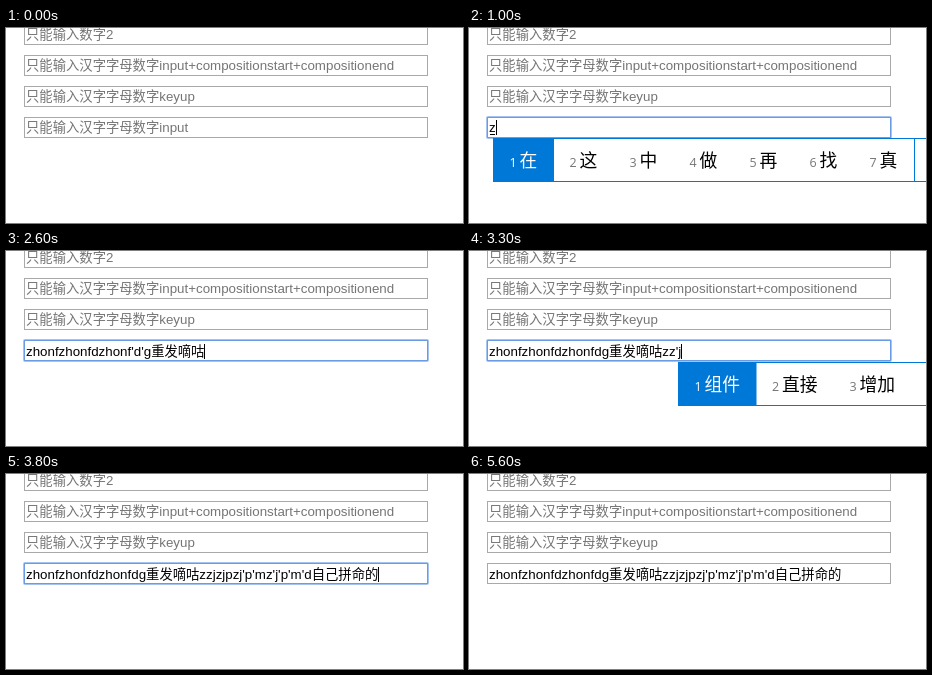
These frames come from a looping animation (457 by 195 pixels, 5700 ms). An HTML page:

```html
<!DOCTYPE html>
<html lang="zh-CN">
<head>
<meta charset="utf-8">
<style>
html, body { margin: 0; width: 100%; height: 100%; overflow: hidden; background: #fff; }
svg { display: block; }
text { font-family: "Liberation Sans", Arial, "Noto Sans CJK SC", "Noto Sans CJK", sans-serif; white-space: pre; }
.field { font-size: 13.333px; }
.cand { font-size: 17.8px; }
.num { font-family: "Open Sans", "Noto Sans", sans-serif; font-size: 12.5px; }
</style>
</head>
<body>
<svg id="stage" width="457" height="195" viewBox="0 0 457 195"></svg>
<script>
const NS = 'http://www.w3.org/2000/svg';
const LOOP = 5700;
const BLUE = '#0078d7';
const stage = document.getElementById('stage');

function add(parent, tag, attrs, content) {
  const el = document.createElementNS(NS, tag);
  set(el, attrs);
  if (content) el.textContent = content;
  parent.appendChild(el);
  return el;
}
function set(el, attrs) {
  for (const k in attrs) el.setAttribute(k, attrs[k]);
}
const show = (el, on) => el.setAttribute('visibility', on ? 'visible' : 'hidden');

const HINT = '只能输入汉字字母数字';
const hints = ['只能输入数字2', HINT + 'input+compositionstart+compositionend', HINT + 'keyup', HINT + 'input'];
let hint;
hints.forEach((label, i) => {
  const y = -4 + 31 * i;
  add(stage, 'rect', { x: 18.5, y: y + .5, width: 403, height: 20, fill: '#fff', stroke: '#a9a9a9' });
  hint = add(stage, 'text', { x: 20, y: y + 15, class: 'field', fill: '#757575' }, label);
});

const ring = add(stage, 'g', { fill: 'none' });
add(ring, 'rect', { x: 17.5, y: 88.5, width: 405, height: 22, rx: 1, stroke: '#a4c3f3' });
add(ring, 'rect', { x: 18.5, y: 89.5, width: 403, height: 20, stroke: '#6a9be4' });
const value = add(stage, 'text', { x: 20, class: 'field', fill: '#000' });
const under = add(stage, 'rect', { x: 21, y: 106, height: 1, fill: '#000' });
const caret = add(stage, 'rect', { width: 1, height: 15, fill: '#000' });
const popup = add(stage, 'g', {});

// Editor states: at = start time, s = text, c = candidates, px = popup x,
// line = underlined composition, off = caret hidden, blur = no focus
const head = 'zhonfzhonf', word = '重发嘀咕';
const base = head + 'dzhonfdg' + word;
const final = base + "zzjzjpzj'p'mz'j'p'm'd自己拼命的";
const zList = ['在', '这', '中', '做', '再', '找', '真'];
const zhong = ['中', '种', '重', '周', '众', '洲', '终'];
const states = [
  { at: 0, s: '', blur: true },
  { at: 400, s: '' },
  { at: 900, s: 'z', line: true },
  { at: 1000, s: 'z', c: zList, px: 24, line: true },
  { at: 1100, s: 'zh', c: ['这', '中', '找', '真', '着', '只', '之'], px: 24, line: true },
  { at: 1200, s: 'zho', c: zhong, px: 24, line: true },
  { at: 1300, s: 'zhon', c: zhong, px: 24, line: true },
  { at: 1500, s: head + "'d" },
  { at: 1900, s: head + "dzhon'f'd'g" },
  { at: 2400, s: head + "dzhon'f'd'g", off: true },
  { at: 2600, s: head + "dzhonf'd'g" + word },
  { at: 3100, s: head + "dzhonfd'g" + word + 'z', c: zList },
  { at: 3300, s: base + "zz'j", c: ['组件', '直接', '增加', '自己'] },
  { at: 3400, s: base + "zzjz'j'p", c: ['自己拍', '直接拍', '自己跑'] },
  { at: 3500, s: base + "zzjzj'pz'j'p'm", c: ['自己拼命', '自己'] },
  { at: 3600, s: base + "zzjzjpz'j'p'mz'j'p'm'd", c: ['自己拼命的', '自己'] },
  { at: 3800, s: final },
  { at: 4300, s: final, off: true },
  { at: 4800, s: final },
  { at: 5300, s: final, off: true },
  { at: 5600, s: final, blur: true }
];

function drawPopup(list, x, y) {
  popup.replaceChildren();
  if (!list) return;
  add(popup, 'rect', { x: x + .5, y: y + .5, width: 700, height: 43, fill: '#fff', stroke: BLUE });
  add(popup, 'rect', { x, y, width: 43.5 + 17.5 * list[0].length, height: 44, fill: BLUE });
  let left = x;
  list.forEach((item, i) => {
    add(popup, 'text', { x: left + 16.5, y: y + 28.5, class: 'num', fill: i ? '#767676' : '#fff' }, String(i + 1));
    add(popup, 'text', { x: left + 26.5, y: y + 29, class: 'cand', fill: i ? '#000' : '#fff' }, item);
    left += 42.5 + 17.5 * item.length;
  });
  if (list.length === 7) add(popup, 'rect', { x: Math.round(left) + 1, y, width: 1, height: 44, fill: BLUE });
}

let current = null;
function render(t) {
  const st = states.findLast(s => s.at <= t);
  if (st === current) return;
  current = st;
  // Lines holding Chinese glyphs sit one pixel lower
  const low = /[^\x00-\x7f]/.test(st.s) ? 1 : 0;
  value.textContent = st.s;
  set(value, { y: 104 + low });
  const end = Math.round(20 + (st.s ? value.getComputedTextLength() : 0));
  show(hint, !st.s);
  show(ring, !st.blur);
  show(caret, !st.blur && !st.off);
  set(caret, { x: end, y: 92 + low });
  show(under, st.line);
  set(under, { width: Math.max(0, end - 22) });
  drawPopup(st.c, st.px || end - 3, 110 + low);
}

const start = performance.now();
function tick() {
  render((performance.now() - start) % LOOP);
  requestAnimationFrame(tick);
}
tick();
</script>
</body>
</html>
```
